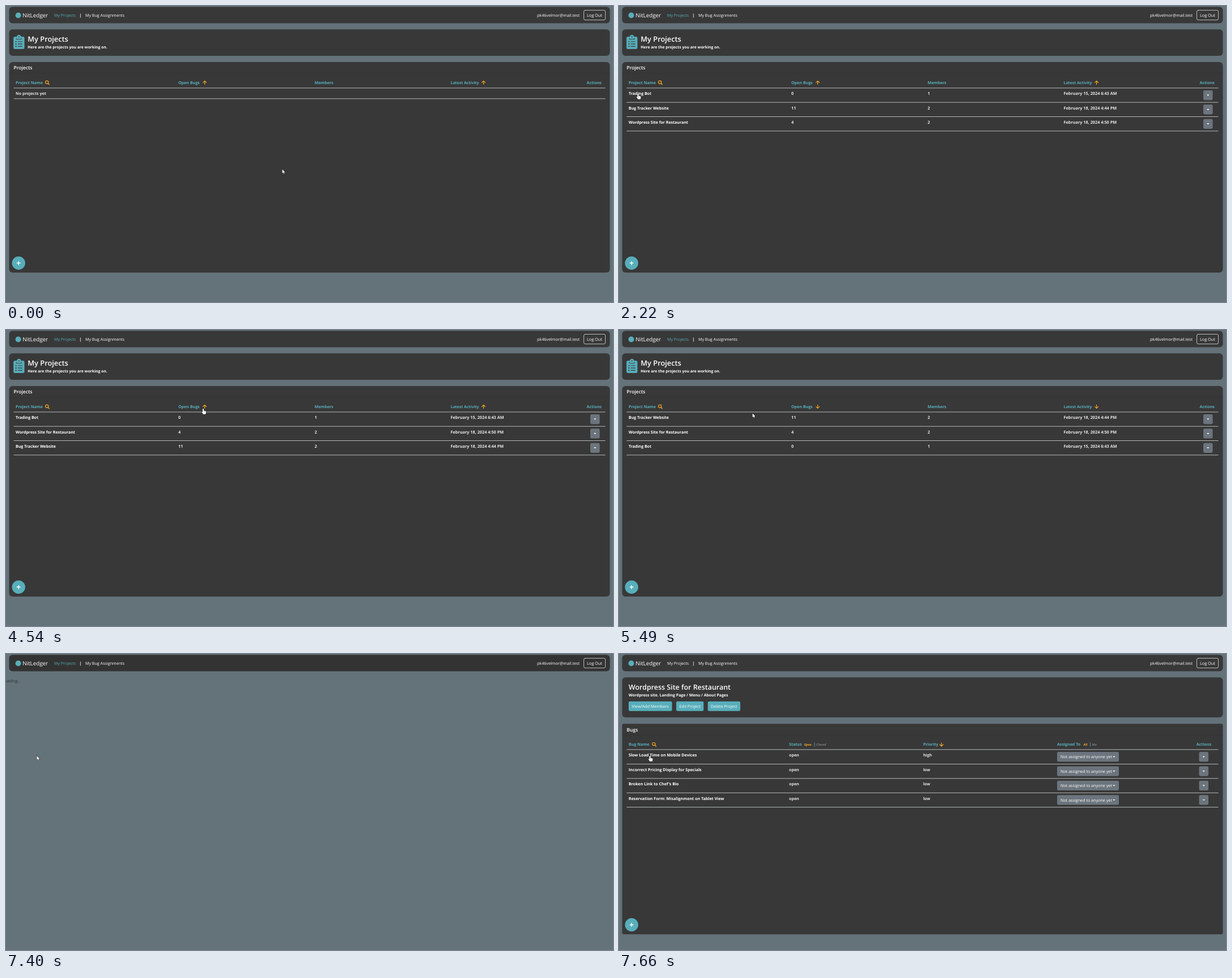
These frames come from a looping animation (1071 px wide and 523 px high, 8 s). An HTML page with a canvas:

```html
<!DOCTYPE html>
<html lang="en">
<head>
<meta charset="utf-8">
<title>Bug tracker</title>
<style>
html, body { margin: 0; width: 100%; height: 100%; overflow: hidden; background: #647279; }
canvas { display: block; }
</style>
</head>
<body>
<canvas id="stage" width="1071" height="523"></canvas>
<script>
const ctx = document.getElementById('stage').getContext('2d');
const LOOP = 8000;
const PAGE = '#647279', PANEL = '#383838', TEAL = '#58aebb', ORANGE = '#f5a623';
const WHITE = '#fff', CELL = '#e6e6e6', GREY = '#6c757d', RULE = '#c4c6c7';
const FAMILY = '"Open Sans", "Noto Sans", sans-serif';

const projects = {
  bot: ['Trading Bot', '0', '1', 'February 15, 2024 6:43 AM'],
  tracker: ['Bug Tracker Website', '11', '2', 'February 18, 2024 4:44 PM'],
  site: ['Wordpress Site for Restaurant', '4', '2', 'February 18, 2024 4:50 PM']
};
const bugs = [
  ['Slow Load Time on Mobile Devices', 'high'],
  ['Incorrect Pricing Display for Specials', 'low'],
  ["Broken Link to Chef's Bio", 'low'],
  ['Reservation Form: Misalignment on Tablet View', 'low']
];

// Pointer hotspot: time, x, y
const path = [
  [30, 487.5, 288.5], [280, 187, 204], [430, 187, 204], [720, 44, 163],
  [900, 49, 155], [960, 49, 155], [990, 49, 154], [1140, 49, 154],
  [1500, 46, 206], [1920, 38, 174], [2220, 33.5, 155], [2370, 33.5, 155],
  [3050, 348, 139], [5130, 348, 139], [5920, 90, 158], [6340, 54.5, 180]
];

function text(str, x, y, size = 7.1, color = WHITE, style = 'bold', align = 'left') {
  ctx.font = `${style} ${size}px ${FAMILY}`;
  ctx.fillStyle = color;
  ctx.textAlign = align;
  ctx.fillText(str, x, y);
}

function box(x, y, w, h, r, color) {
  ctx.fillStyle = color;
  ctx.beginPath();
  ctx.roundRect(x, y, w, h, r);
  ctx.fill();
}

function disc(x, y, r, color) {
  ctx.fillStyle = color;
  ctx.beginPath();
  ctx.arc(x, y, r, 0, Math.PI * 2);
  ctx.fill();
}

function stroke(color, width, ...lines) {
  ctx.strokeStyle = color;
  ctx.lineWidth = width;
  ctx.lineCap = ctx.lineJoin = 'round';
  ctx.beginPath();
  for (const line of lines) line.forEach(([x, y], i) => i ? ctx.lineTo(x, y) : ctx.moveTo(x, y));
  ctx.stroke();
}

function rule(y) {
  ctx.fillStyle = RULE;
  ctx.fillRect(13.5, y - 0.45, 1044, 0.9);
}

function caret(x, y) {
  ctx.fillStyle = WHITE;
  ctx.beginPath();
  ctx.moveTo(x - 2.2, y - 1);
  ctx.lineTo(x + 2.2, y - 1);
  ctx.lineTo(x, y + 1.2);
  ctx.fill();
}

function arrow(x, y, down) {
  const d = down ? 1 : -1;
  stroke(ORANGE, 1.2,
    [[x, y - 3 * d], [x, y + 3 * d]],
    [[x - 3, y], [x, y + 3 * d], [x + 3, y]]);
}

function magnifier(x, y) {
  ctx.strokeStyle = ORANGE;
  ctx.lineWidth = 1.2;
  ctx.beginPath();
  ctx.arc(x, y, 2.6, 0, Math.PI * 2);
  ctx.stroke();
  stroke(ORANGE, 1.4, [[x + 2, y + 2], [x + 4, y + 4]]);
}

function addButton(y) {
  disc(22.2, y, 11.7, TEAL);
  stroke(WHITE, 1.4, [[19.3, y], [25.1, y]], [[22.2, y - 2.9], [22.2, y + 2.9]]);
}

function menuButton(x, y) {
  box(x, y - 8.6, 16.5, 17.2, 2.4, GREY);
  caret(x + 8.25, y);
}

function clipboard() {
  disc(22.8, 54.8, 3.7, TEAL);
  box(13.2, 54.2, 19.3, 21.8, 2.5, TEAL);
  disc(22.8, 54.6, 1, PANEL);
  stroke(PANEL, 0.9, [[18.4, 57], [18.4, 58.8], [27.2, 58.8], [27.2, 57]]);
  for (const y of [63, 67.2, 71.4]) {
    disc(17.6, y, 1.1, PANEL);
    stroke(PANEL, 1.2, [[21.3, y], [28.4, y]]);
  }
}

function navbar(linkColor, fill) {
  box(5.5, 1.5, 1060, 29, 6, fill);
  disc(21.6, 16.5, 5, TEAL);
  text('NitLedger', 29.3, 20.2, 9.8, WHITE, '400');
  text('My Projects', 85, 19, 7.1, linkColor, '400');
  text('|', 131.4, 19, 7.4, WHITE, 'bold', 'center');
  text('My Bug Assignments', 140, 19, 7.14, WHITE, '400');
  text('pk46velmor@mail.test', 1012, 19, 7.2, WHITE, '400', 'right');
  ctx.strokeStyle = '#dedede';
  ctx.lineWidth = 0.8;
  ctx.beginPath();
  ctx.roundRect(1019.5, 7.5, 38, 17.2, 2.5);
  ctx.stroke();
  text('Log Out', 1025, 19, 7.3, WHITE, '400');
}

function tablePanel(y, radius, title) {
  box(5.5, y, 1060, 372, radius, PANEL);
  ctx.fillStyle = '#323232';
  ctx.fillRect(5.5, y + 19.5, 1060, 0.8);
  text(title, 13.5, y + 13.3, 8.5, WHITE, '600');
  addButton(y + 355.3);
}

function projectsPage(rows, down) {
  box(5.5, 41.3, 1060, 46.7, 6, PANEL);
  clipboard();
  text('My Projects', 38.3, 63, 12.8, WHITE, '600');
  text('Here are the projects you are working on.', 38.3, 74.7, 6.8);
  tablePanel(99, 6, 'Projects');

  text('Project Name', 17, 138, 7.07, TEAL);
  magnifier(72.2, 134.8);
  text('Open Bugs', 304, 138, 7.07, TEAL);
  arrow(350.6, 135.4, down);
  text('Members', 544.5, 138, 7.07, TEAL);
  text('Latest Activity', 784.5, 138, 6.95, TEAL);
  arrow(842.6, 135.4, down);
  text('Actions', 1024.5, 138, 7.1, TEAL);
  rule(144.9);

  if (!rows) {
    text('No projects yet', 17, 157.2, 7.1, CELL);
    rule(163.8);
    return;
  }
  rows.forEach((key, i) => {
    const dy = i * 25.35, [name, open, members, date] = projects[key];
    text(name, 17, 157.2 + dy, 7);
    text(open, 304, 157.2 + dy, 7.3, CELL);
    text(members, 544.5, 157.2 + dy, 7.3, CELL);
    text(date, 784.5, 157.2 + dy, 7.3, CELL);
    menuButton(1031, 157.6 + dy);
    rule(170.2 + dy);
  });
}

function bugsPage() {
  box(5.5, 41.3, 1060, 70.7, 6, PANEL);
  text('Wordpress Site for Restaurant', 17, 63, 12.45, WHITE, '600');
  text('Wordpress site. Landing Page / Menu / About Pages', 17, 74.7, 6.9);
  for (const [label, x, w] of [['View/Add Members', 17, 76.5], ['Edit Project', 101, 48.3], ['Delete Project', 156.7, 57.3]]) {
    box(x, 83.8, w, 17, 2.4, TEAL);
    text(label, x + w / 2, 95, 7.15, WHITE, '400', 'center');
  }
  tablePanel(123.2, 3, 'Bugs');

  text('Bug Name', 17, 162.3, 7.07, TEAL);
  magnifier(61.4, 159.1);
  text('Status', 300, 162.3, 7.07, TEAL);
  text('Open', 326.4, 162.3, 5.4, ORANGE, 'italic bold');
  text('|', 345, 162.3, 7.4, TEAL, 'bold', 'center');
  text('Closed', 348, 162.3, 5.6, '#7c7f82', 'italic bold');
  text('Priority', 536.7, 162.3, 7.07, TEAL);
  arrow(569, 160, true);
  text('Assigned To', 773, 162.3, 7.07, TEAL);
  text('All', 819.6, 162.3, 5.5, ORANGE, 'italic bold');
  text('|', 831.3, 162.3, 7.4, TEAL, 'bold', 'center');
  text('Me', 834.8, 162.3, 5.5, '#7c7f82', 'italic bold');
  text('Actions', 1018.8, 162.3, 7.1, TEAL);
  rule(168.9);

  bugs.forEach(([name, priority], i) => {
    const dy = i * 25.4;
    text(name, 17, 181.4 + dy);
    text('open', 300, 181.4 + dy, 7.1, CELL);
    text(priority, 536.7, 181.4 + dy, 7.1, CELL);
    box(773, 173.1 + dy, 109, 17.2, 2.4, GREY);
    text('Not assigned to anyone yet', 779, 184.3 + dy, 7.18, WHITE, '400');
    caret(873.4, 181.7 + dy);
    menuButton(1023.5, 181.7 + dy);
    rule(194.5 + dy);
  });
}

function pointerAt(t) {
  const next = path.findIndex(p => p[0] > t);
  if (next < 0) return path[path.length - 1].slice(1);
  if (next === 0) return path[0].slice(1);
  const [t0, x0, y0] = path[next - 1], [t1, x1, y1] = path[next];
  const u = (t - t0) / (t1 - t0), e = u * u * (3 - 2 * u);
  return [x0 + (x1 - x0) * e, y0 + (y1 - y0) * e];
}

function pointer(x, y, hand) {
  const shape = hand
    ? 'M-1 1Q-1 0 0 0Q1 0 1 1V3.6Q2 3.1 2.5 3.9Q3.5 3.5 3.9 4.3Q5 4.1 5 5.2V7Q5 8.4 4 9.7H-.2Q-1 8.2-2.4 6.6Q-2.9 5.6-2 5.3Q-1.5 5.3-1 6Z'
    : 'M0 0V7L1.6 5.6L2.7 8L3.8 7.5L2.8 5.2H5Z';
  const p = new Path2D(shape);
  ctx.save();
  ctx.translate(x, y);
  ctx.lineWidth = 0.8;
  ctx.strokeStyle = '#111';
  ctx.stroke(p);
  ctx.fillStyle = WHITE;
  ctx.fill(p);
  if (hand) stroke('#777', 0.35, [[1, 4], [1, 6]], [[2.5, 4.2], [2.5, 6]], [[3.9, 4.6], [3.9, 6]]);
  ctx.restore();
}

function linkColor(t) {
  const u = Math.min(1, Math.max(0, (t - 7420) / 180));
  const mix = c => Math.round(c + (255 - c) * u);
  return `rgb(${mix(88)},${mix(174)},${mix(187)})`;
}

function draw(t) {
  const [x, y] = pointerAt(t);
  const loading = t >= 7400 && t < 7460;
  ctx.textRendering = 'geometricPrecision';
  ctx.fillStyle = PAGE;
  ctx.fillRect(0, 0, 1071, 523);
  navbar(linkColor(t), loading ? '#333' : PANEL);

  if (loading) {
    text('Loading...', -6, 50, 7.15, '#2c3237', '400');
  } else if (t >= 7460) {
    bugsPage();
  } else {
    const down = (t >= 3300 && t < 4540) || t >= 5130;
    const rows = t < 30 ? null
      : t < 3300 ? ['bot', 'tracker', 'site']
      : down ? ['tracker', 'site', 'bot'] : ['bot', 'site', 'tracker'];
    projectsPage(rows, down);
  }
  const overName = x < 123 && y > 148 && y < 212;
  const overSort = x > 345 && x < 355 && y < 142;
  pointer(x, y, !loading && (overName || overSort));
}

function tick(now) {
  draw(now % LOOP);
  requestAnimationFrame(tick);
}
draw(0);
requestAnimationFrame(tick);
</script>
</body>
</html>
```
